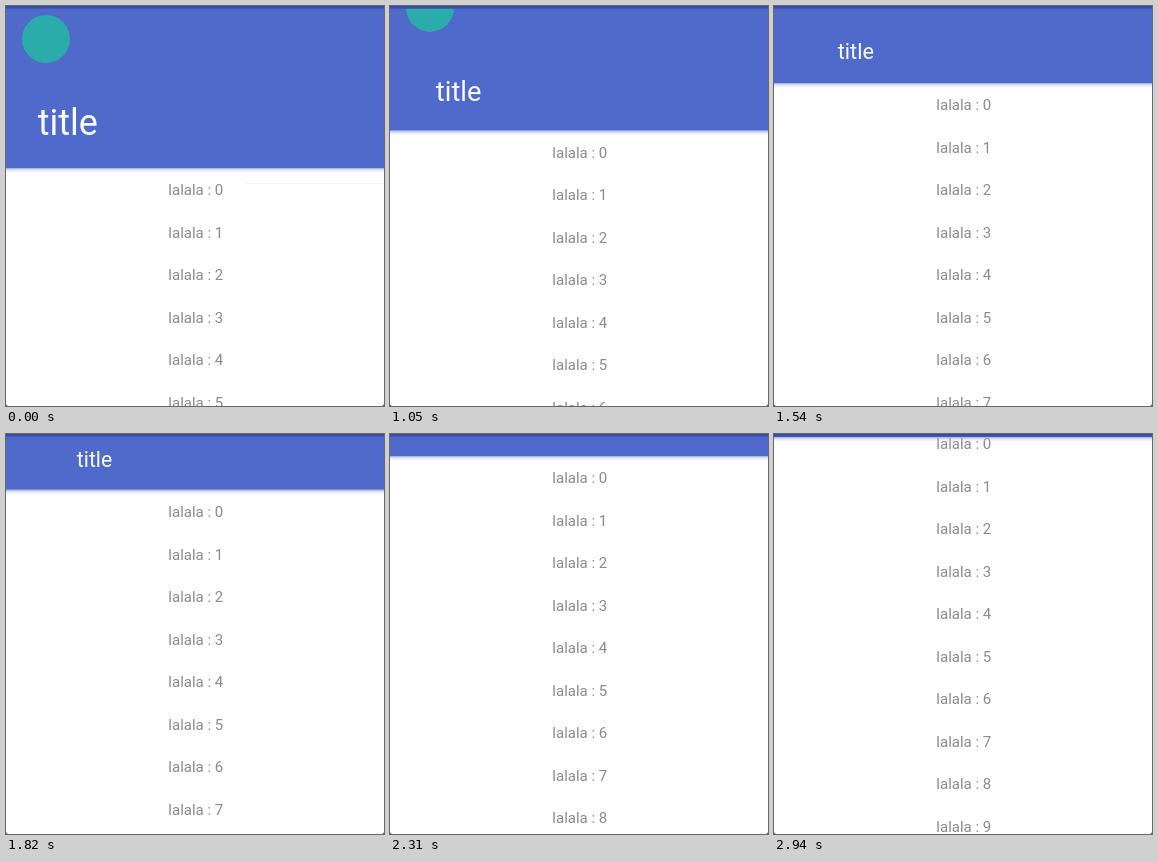
These frames come from a looping animation (378 by 400 pixels, 3.57 s). An HTML page:

```html
<!DOCTYPE html>
<html lang="en">
<head>
<meta charset="utf-8">
<style>
  html, body { margin: 0; width: 100%; height: 100%; overflow: hidden; background: #fefefe; }
  svg { display: block; width: 100vw; height: 100vh; font-family: Roboto, Arial, sans-serif; }
</style>
</head>
<body>
<svg viewBox="0 0 378 400">
  <defs>
    <linearGradient id="fade" x1="0" y1="0" x2="0" y2="1">
      <stop offset="0" stop-color="#7286d0" stop-opacity=".75"/>
      <stop offset=".35" stop-color="#a9b4e0" stop-opacity=".42"/>
      <stop offset="1" stop-color="#d5daf0" stop-opacity="0"/>
    </linearGradient>
    <linearGradient id="status" x1="0" y1="0" x2="0" y2="1">
      <stop offset="0" stop-color="#34479f"/>
      <stop offset="1" stop-color="#3e56b4"/>
    </linearGradient>
  </defs>
  <rect width="378" height="400" fill="#fefefe"/>
  <path id="hairline" d="M240 177.5H378" stroke="#f5f5f5"/>
  <g id="rows" fill="#8b8b8b" font-size="15" text-anchor="middle"></g>
  <g id="bar">
    <rect y="-38" width="378" height="200" fill="#4f6aca"/>
    <rect y="162" width="378" height="5" fill="url(#fade)"/>
  </g>
  <circle id="icon" cx="40" cy="33" r="24" fill="#2babaa"/>
  <text id="title" fill="#fafbff">title</text>
  <rect width="378" height="2.8" fill="url(#status)"/>
  <path d="M0 398V400H2Q.4 399.6 0 398M378 398V400H376Q377.6 399.6 378 398" fill="#555"/>
</svg>
<script>
  const LOOP = 3570, STEP = 70;
  const ROW_GAP = 42.5, ROW_COUNT = 10;
  const COLLAPSE = 104;   // scroll distance over which the title shrinks
  const BAR_TRAVEL = 159; // the bar then rests under the status strip
  const scrollKeys = [
    [770, 0], [1050, 37.5], [1540, 85], [2100, 127.5],
    [2520, 152.5], [2590, 159], [2660, 159], [2940, 174]
  ];

  const el = id => document.getElementById(id);
  const [rows, bar, icon, title, hairline] =
    ['rows', 'bar', 'icon', 'title', 'hairline'].map(el);
  const mix = (a, b, k) => a + (b - a) * k;
  const shift = (node, y) => node.setAttribute('transform', `translate(0 ${y})`);

  for (let i = 0; i < ROW_COUNT; i++) {
    const row = document.createElementNS('http://www.w3.org/2000/svg', 'text');
    row.setAttribute('x', 189.8);
    row.setAttribute('y', 189.3 + i * ROW_GAP);
    row.textContent = `lalala : ${i}`;
    rows.append(row);
  }

  function scrollAt(t) {
    const next = scrollKeys.findIndex(key => key[0] > t);
    if (next === 0) return 0;
    if (next < 0) return scrollKeys.at(-1)[1];
    const [t0, s0] = scrollKeys[next - 1], [t1, s1] = scrollKeys[next];
    return mix(s0, s1, (t - t0) / (t1 - t0));
  }

  function render(t) {
    const scroll = scrollAt(t);
    const collapsed = Math.min(1, scroll / COLLAPSE);
    const shrink = 1 - (1 - collapsed) ** 2;
    const past = Math.max(0, scroll - COLLAPSE);

    shift(rows, -scroll);
    shift(bar, -Math.min(scroll, BAR_TRAVEL));
    shift(icon, -scroll * 0.83);
    title.setAttribute('x', mix(31.8, 70.8, collapsed));
    title.setAttribute('y', mix(129, 35.5, collapsed) - past);
    title.setAttribute('font-size', mix(36, 21.2, shrink));
    hairline.setAttribute('visibility', t < 770 ? 'visible' : 'hidden');
  }

  const start = performance.now();
  function tick() {
    const t = (performance.now() - start) % LOOP;
    render(Math.floor(t / STEP) * STEP);
    requestAnimationFrame(tick);
  }
  render(0);
  requestAnimationFrame(tick);
</script>
</body>
</html>
```
